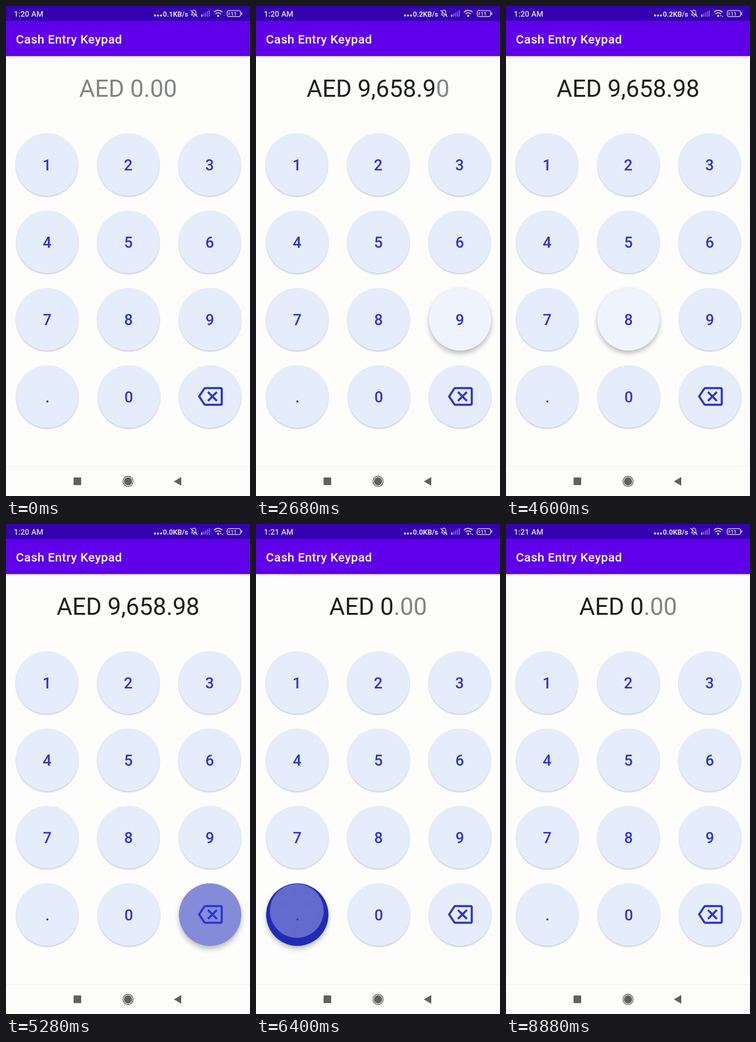
An HTML page for the animation above (9000 ms loop, 529 by 1058 pixels).

```html
<!DOCTYPE html>
<html lang="en">
<head>
<meta charset="utf-8">
<title>Cash Entry Keypad</title>
<style>
  html, body { margin: 0; width: 100%; height: 100%; overflow: hidden; background: #fdfefc; }
  #stage { position: relative; width: 529px; height: 1058px; overflow: hidden; background: #fdfefc; }
  .bar { position: absolute; left: 0; width: 100%; }
  #status { top: 0; height: 32px; background: #3400b0; }
  #appbar { top: 32px; height: 75.5px; background: #6000ea; box-shadow: 0 1px 4px rgba(0, 0, 0, .28); }
  #nav { top: 994px; height: 1px; background: #ebecea; }
  .key { position: absolute; width: 135px; height: 135px; border-radius: 50%; }
  svg { position: absolute; left: 0; top: 0; font-family: Roboto, sans-serif; }
  #labels { font-size: 33px; font-weight: 500; fill: #2e35d0; text-anchor: middle; }
  #amount { font-size: 52px; text-anchor: middle; white-space: pre; }
  #typed { fill: #1c1f1d; }
  #rest { fill: #828483; }
  #title { font-size: 26.5px; font-weight: 500; letter-spacing: .5px; fill: #fff; }
  .light { fill: #e6dff7; }
  .line { fill: none; stroke: #e6dff7; }
</style>
</head>
<body>
<div id="stage">
  <div class="bar" id="appbar"></div>
  <div class="bar" id="status"></div>
  <div class="bar" id="nav"></div>
  <div id="keys"></div>
  <svg width="529" height="1058" viewBox="0 0 529 1058">
    <g class="light">
      <text id="clock" x="17" y="22.5" font-size="17" font-weight="500"></text>
      <circle cx="323" cy="20.5" r="2.2"/><circle cx="329.5" cy="20.5" r="2.2"/><circle cx="336" cy="20.5" r="2.2"/>
      <text id="speed" x="340" y="22.5" font-size="15.3" font-weight="700"></text>
      <rect x="423" y="18.5" width="2.6" height="4.5"/>
      <g opacity=".4">
        <rect x="427.1" y="16.5" width="2.6" height="6.5"/><rect x="431.2" y="14" width="2.6" height="9"/>
        <rect x="435.3" y="11.5" width="2.6" height="11.5"/><rect x="439.4" y="9" width="2.6" height="14"/>
      </g>
      <circle cx="460" cy="21.3" r="2.2"/>
      <path id="arrows" d="M464 21.5l1.7-2.5 1.7 2.5zM467.5 21.5h3.4l-1.7 2.5z"/>
      <rect x="510" y="13.5" width="2" height="5.5" rx="1"/>
      <text x="493.5" y="20.7" font-size="11.5" font-weight="500" text-anchor="middle">11</text>
    </g>
    <g class="line" stroke-width="1.5">
      <path d="M402.5 19.5h10.5l-1.5-2.5v-4a4 4 0 0 0-8 0v4zM405.8 22.5h3.4M400 9l15 14.5"/>
      <path stroke-width="2" d="M450.7 13.4a13.2 13.2 0 0 1 18.6 0M454.2 17.2a8.2 8.2 0 0 1 11.6 0"/>
      <rect x="479.5" y="10" width="29" height="12.8" rx="3.5" stroke-width="1.6"/>
    </g>
    <rect x="482.5" y="13" width="2.6" height="7" rx=".8" fill="#e08a4a"/>

    <text id="title" x="21.5" y="80.5">Cash Entry Keypad</text>
    <text id="amount" x="264.7" y="196"><tspan id="typed"></tspan><tspan id="rest"></tspan></text>
    <g id="labels">
      <path transform="translate(416 816) scale(2.25)" d="M22 3H7c-.69 0-1.23.35-1.59.88L0 12l5.41 8.11c.36.53.9.89 1.59.89h15c1.1 0 2-.9 2-2V5c0-1.1-.9-2-2-2zm0 16H7.07L2.4 12l4.66-7H22v14zm-11.59-2L14 13.41 17.59 17 19 15.59 15.41 12 19 8.41 17.59 7 14 10.59 10.41 7 9 8.41 12.59 12 9 15.59z"/>
    </g>
    <g fill="#5f605f">
      <rect x="146.5" y="1018" width="16.5" height="16.5" rx="1"/>
      <circle cx="264.6" cy="1026.4" r="8.8"/>
      <circle cx="264.6" cy="1026.4" r="11" fill="none" stroke="#5f605f" stroke-width="1.6"/>
      <path d="M364 1026.4L380 1017v18.8z"/>
    </g>
  </svg>
</div>
<script>
  const LOOP = 9000, STEP = 40, LONG_PRESS = 480, BACK = '<';
  // key, finger down, finger up (ms)
  const PRESSES = [
    ['9', 355, 490], ['6', 790, 910], ['5', 1250, 1380], ['8', 1675, 1810],
    ['.', 2120, 2230], ['9', 2560, 2670], ['6', 2960, 3070], [BACK, 3415, 3540],
    ['8', 3790, 3890], ['8', 4275, 4575], [BACK, 4980, 5590],
    ['0', 5960, 6070], ['.', 6320, 6430], ['8', 6660, 6760], ['6', 7010, 7120],
    [BACK, 7375, 7500], [BACK, 7955, 8070], [BACK, 8430, 8560]
  ];

  const $ = id => document.getElementById(id);
  const clamp = v => Math.max(0, Math.min(1, v));
  const smooth = p => p * p * (3 - 2 * p);
  const mix = (a, b, p) => a + (b - a) * p;
  const setText = (id, s) => { if ($(id).textContent !== s) $(id).textContent = s; };

  const keys = {};
  [...'123456789.0' + BACK].forEach((name, i) => {
    const row = Math.floor(i / 3);
    const x = 88.7 + 176.3 * (i % 3) + .35 * row, y = 342 + 167.1 * row;
    const el = document.createElement('div');
    el.className = 'key';
    el.style.left = x - 67.5 + 'px';
    el.style.top = y - 67.5 + 'px';
    $('keys').append(el);
    keys[name] = el;
    if (name === BACK) return;
    const label = document.createElementNS('http://www.w3.org/2000/svg', 'text');
    label.setAttribute('x', x);
    label.setAttribute('y', y + 13);
    label.textContent = name;
    $('labels').append(label);
  });

  function inputAt(t) {
    let s = '';
    for (const [key, down, up] of PRESSES) {
      const long = key === BACK && up - down > LONG_PRESS;
      if (t < (long ? down + LONG_PRESS : up)) break;
      if (long) s = '';
      else if (key === BACK) s = s.slice(0, -1);
      else if (!/\.\d\d$/.test(s)) s += key;
    }
    return s;
  }

  function drawAmount(t) {
    const s = inputAt(t);
    const [whole, cents] = s.split('.');
    let typed = '', rest = 'AED 0.00';
    if (s) {
      typed = 'AED ' + whole.replace(/\B(?=(\d{3})+$)/g, ',');
      rest = '.00';
      if (cents !== undefined) {
        typed += '.' + cents;
        rest = '00'.slice(cents.length);
      }
    }
    setText('typed', typed);
    setText('rest', rest);
  }

  function drawKey(name, t) {
    const press = PRESSES.filter(p => p[0] === name && p[1] <= t).pop();
    let lift = 0, alpha = 0, radius = 0, grow = 0, held = false;
    if (press) {
      const [, down, up] = press;
      held = t < up;
      grow = smooth(clamp((t - down) / 225));
      radius = mix(42, 96, grow);
      alpha = .45 * clamp((Math.min(t, up) - down) / 120) * (1 - clamp((t - up) / 150));
      lift = smooth(clamp((Math.min(t, up) - down) / 100)) * (1 - smooth(clamp((t - up) / 100)));
    }
    // the ripple drifts from the touch point to the centre
    const cx = mix(66, 67.5, grow), cy = mix(56, 67.5, grow);
    const white = a => `rgba(255,255,255,${a.toFixed(3)})`;
    const style = keys[name].style;
    style.background =
      `radial-gradient(circle at ${cx}px ${cy}px, ${white(alpha)} ${radius}px, ${white(0)} ${radius + 1}px), ` +
      (held ? '#1f2cb8' : '#e5ecfb');
    style.boxShadow =
      `0 ${mix(2, 7, lift)}px ${mix(3, 12, lift)}px rgba(0,0,0,${mix(.2, .25, lift)}), ` +
      `0 0 ${mix(2, 5, lift)}px rgba(0,0,0,.07)`;
  }

  function draw(now) {
    const t = Math.floor(now % LOOP / STEP) * STEP;
    drawAmount(t);
    Object.keys(keys).forEach(name => drawKey(name, t));
    setText('clock', t < 6400 ? '1:20 AM' : '1:21 AM');
    setText('speed', (t < 1240 ? '0.1' : t < 5200 ? '0.2' : '0.0') + 'KB/s');
    const traffic = (t >= 1240 && t < 2600) || (t >= 4280 && t < 8200);
    $('arrows').style.visibility = traffic ? 'visible' : 'hidden';
  }

  const start = performance.now();
  function tick() {
    draw(performance.now() - start);
    requestAnimationFrame(tick);
  }
  tick();
</script>
</body>
</html>
```
